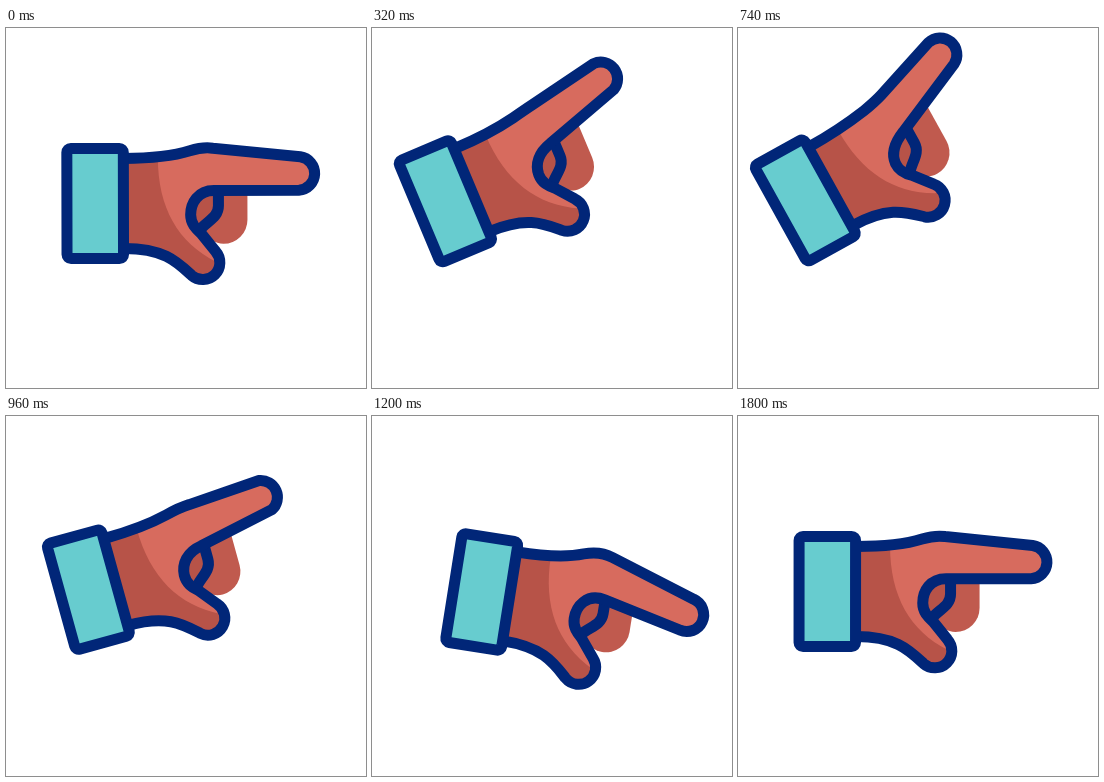
Animation, 360 px wide and 360 px high, one loop 1820 ms. Source, as an HTML page without scripts:

```html
<!DOCTYPE html>
<html lang="en">
<head>
<meta charset="utf-8">
<title>Pointing hand</title>
<style>
  :root {
    --navy: #012678;
    --skin: #d76b5e;
    --shade: #b75348;
    --fold: #c05a4e;
    --cuff: #67cccf;
    --rest: path("M118 130.5 C150 130.5 168 128 184 123 Q197 119 207 120.5 L294.5 129.3 A16.8 16.8 0 0 1 293 162.7 L208 162.7 C192 162.7 184.7 175 184.7 187 C184.7 196 190 201 195 205.5 L209.5 223.5 A17 17 0 0 1 185.5 247.5 C171 234 158 220.5 118 220.5");
    --up: path("M118 130.5 C150 130.5 168 128 184 125.5 Q198 123 207 120 L273.3 97 A16.8 16.8 0 0 1 285.5 128.1 L208 163 C195 168.5 187 176 186 187 C185.5 196 190 201 195 205.5 L209.5 223.5 A17 17 0 0 1 185.5 247.5 C171 234 158 220.5 118 220.5");
    --down: path("M118 130.5 C150 130.5 168 128 184 122 Q200 116.5 213 121 L299.9 149.6 A16.8 16.8 0 0 1 290.8 182.1 L212 164 C193 160 184.7 175 184.7 187 C184.7 196 190 201 195 205.5 L209.5 223.5 A17 17 0 0 1 185.5 247.5 C171 234 158 220.5 118 220.5");
  }
  html, body {
    margin: 0;
    width: 100%;
    height: 100%;
    overflow: hidden;
    background: #fff;
  }
  svg { display: block; width: 100%; height: 100%; }

  .arm {
    transform-box: view-box;
    transform-origin: 89.5px 175.5px;
    animation: tilt 1820ms infinite, shift 1820ms infinite;
  }
  .hand { d: var(--rest); animation: bend 1820ms infinite; }
  .arm, .hand { animation-timing-function: cubic-bezier(.33, 0, .67, 1); }
  .skin { fill: var(--skin); }
  .shade { fill: var(--shade); }
  .fold { fill: var(--fold); }
  .line { fill: none; stroke: var(--navy); stroke-width: 11; stroke-linejoin: round; }
  .cuff { fill: var(--cuff); }

  /* quick lift, then the default swing down and back */
  @keyframes tilt {
    0% { rotate: 0deg; animation-timing-function: cubic-bezier(.33, 1, .67, 1); }
    43.956% { rotate: -29deg; }
    65.934% { rotate: 9deg; }
    100% { rotate: 0deg; }
  }
  @keyframes shift {
    0% { translate: 0 0; animation-timing-function: cubic-bezier(.33, .85, .67, 1); }
    43.956% { translate: -22px -3.2px; }
    65.934% { translate: 20.5px .5px; }
    100% { translate: 0 0; }
  }
  @keyframes bend {
    0% { d: var(--rest); animation-timing-function: cubic-bezier(.33, .85, .67, 1); }
    43.956% { d: var(--up); }
    65.934% { d: var(--down); }
    100% { d: var(--rest); }
  }
</style>
</head>
<body>
<svg viewBox="0 0 360 360">
  <g class="arm">
    <!-- curled fingers -->
    <path class="fold" d="M210 148 H241.5 V192 A24 24 0 0 1 217.5 216 C209 216 203 211 194 203Z"/>
    <path class="shade" d="M212.5 160 V178 C212.5 190 201 193 193 203 L186 190 L190 168Z"/>
    <path class="line" d="M212.5 162 V178 C212.5 190 201 193 193 203"/>

    <path class="hand skin"/>
    <path class="shade" d="M118 130 H152 C152 180 172 215 210 234 L213 240 A17 17 0 0 1 185.5 247.5 C171 234 158 220.5 118 220.5Z"/>
    <path class="hand line"/>

    <rect class="line cuff" x="61" y="120.5" width="56.5" height="110" rx="4"/>
  </g>
</svg>
</body>
</html>
```
